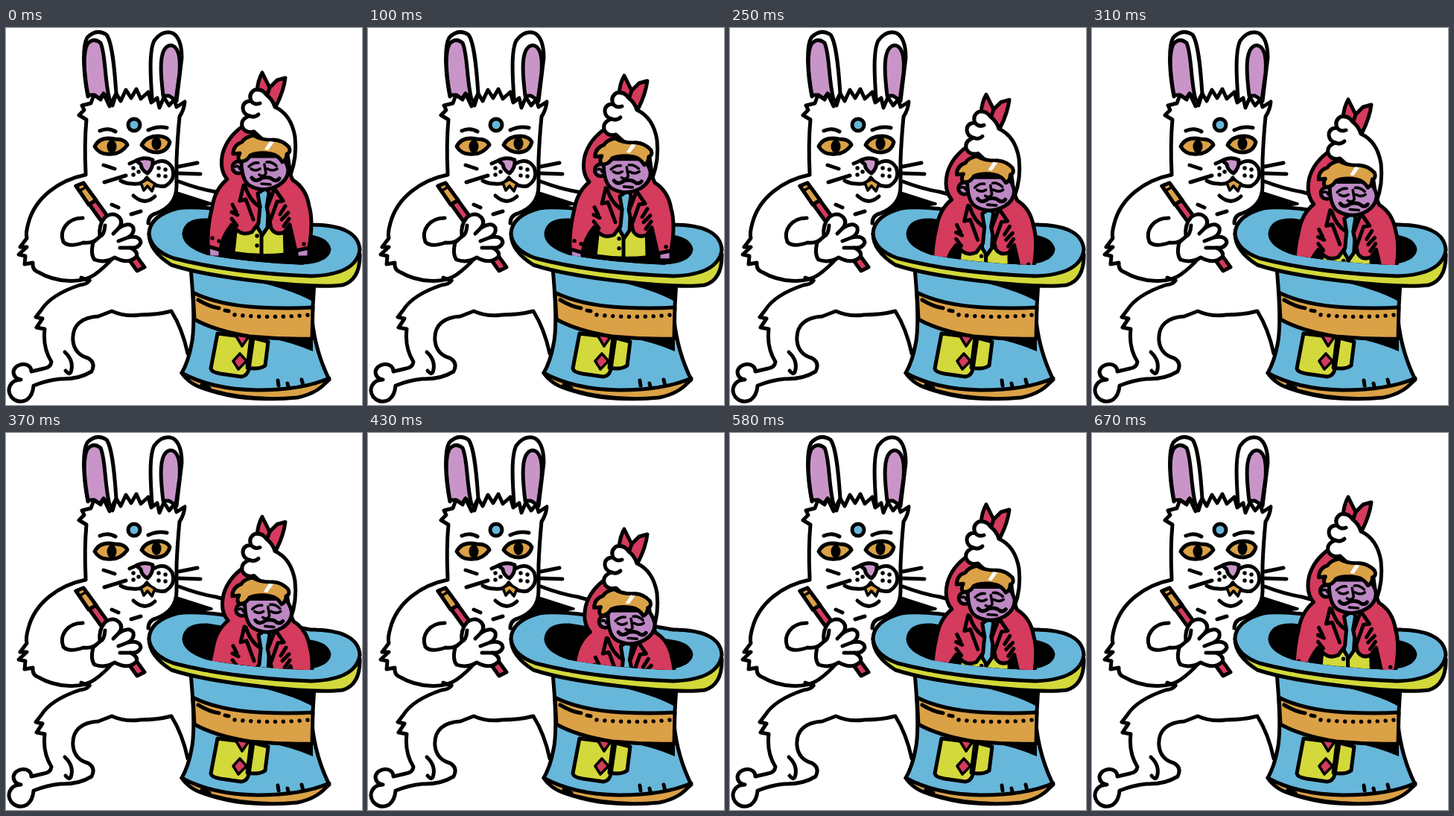
An HTML page that plays this animation: 478x506 px, repeating every 0.7 s.

```html
<!DOCTYPE html>
<html lang="en">
<meta charset="utf-8">
<title>Rabbit and hat</title>
<style>
html, body { margin: 0; height: 100%; overflow: hidden; background: #fff }
svg { display: block; width: 100vw; height: 100vh }
path, circle, ellipse { stroke: #000; stroke-width: 5; stroke-linecap: round; stroke-linejoin: round; fill: none }
.white { fill: #fff }
.blue { fill: #67b7da }
.gold { fill: #dba146 }
.red { fill: #d43b5d }
.lime { fill: #d3d93a }
.pink { fill: #c995c9 }
.skin { fill: #bd88c3 }
.ink { fill: #000 }
.bare { stroke: none }
.fine { stroke-width: 3.6 }
.spots { stroke-width: 5.4 }
</style>
<svg viewBox="0 0 478 506">
<clipPath id="rim"><path d="M0 0H478V312Q440 318 400 318Q330 315 272 305Q250 300 238 290H0Z"/></clipPath>

<g id="rabbit">
  <path d="M110 92C104 62 102 25 109 13Q121 0 135 9C143 20 146 58 148 88L143 104"/>
  <path class="pink" d="M110 90C105 62 103 35 109 22Q117 12 127 20C134 36 132 68 139 96L131 88L126 95L119 90Z"/>
  <path d="M196 94C194 65 192 31 199 17Q210 2 224 7Q236 14 236 40L229 98"/>
  <path class="pink" d="M211 91C208 65 206 42 212 30Q218 20 226 25Q235 32 233 60L228 97L219 91Z"/>
  <path d="M107 195Q105 155 108 123L98 117L105 110L102 104L114 101L118 90L127 96L131 88L139 105L148 88L154 98L161 83L168 94L175 82L181 95L191 86L195 100L203 94L206 107L212 93L219 104L226 96L229 106L240 99Q239 110 233 119Q230 150 229 178V212Q229 239 201 249Q191 252 191 262"/>
  <path class="ink fine" d="M229 221L276 236L250 240Q226 239 206 247Q224 240 229 221Z"/>
  <path d="M232 206Q258 216 282 220Q304 225 325 239"/>

  <path d="M126 138Q137 133 147 139M191 137Q204 131 216 134"/>
  <circle class="blue" cx="172" cy="130" r="8"/>
  <path class="gold" d="M119 159Q126 145 146 149Q160 149 163 157Q154 169 142 169Q126 171 119 159ZM182 157Q188 145 205 145Q217 146 220 153Q217 166 203 167Q190 167 182 157Z"/>
  <ellipse class="ink bare" cx="142" cy="159" rx="6.5" ry="9"/>
  <ellipse class="ink bare" cx="202" cy="155" rx="6.5" ry="9"/>
  <path class="pink" d="M175 178Q185 172 197 177Q198 188 190 195Q182 191 181 183Z"/>
  <path d="M166 182L175 178M198 182Q214 173 223 187Q229 203 214 212Q199 215 189 201Q183 211 170 209Q161 209 154 205"/>
  <path class="gold fine" d="M181 208L185 218L190 212L196 219L200 209L190 203Z"/>
  <path d="M171 225Q186 239 200 226M131 184L146 189M132 207L161 198M232 186L257 181M232 195L261 196M142 237L151 241M168 250L181 246"/>
  <path class="spots" d="M171 188h.1M178 193h.1M171 197h.1M205 188h.1M214 190h.1M205 198h.1M214 199h.1"/>

  <path d="M107 197C72 204 39 227 30 262Q26 276 28 282L19 294L28 294L17 304L26 306L25 317L36 315Q35 325 44 328C66 341 101 344 119 331Q133 321 144 308"/>
  <path d="M103 255C82 255 71 272 77 287Q84 295 104 288Q116 290 125 281"/>
  <path class="red" d="M94 212L104 208L186 321L176 326Z"/>
  <path class="gold" d="M94 212L104 208L121 231L111 237Z"/>
  <path class="fine" d="M98 219L108 213"/>
  <path class="white" d="M126 280Q124 264 133 254Q144 246 152 254Q158 261 151 269Q166 259 171 268Q173 276 164 281Q180 278 181 288Q178 296 167 295Q178 300 175 307Q164 318 146 308Q133 316 119 311Q113 304 117 288Z"/>
  <path d="M126 280Q132 278 133 265M151 269L144 276M164 281L151 286M167 295L153 295"/>

  <path d="M112 339Q109 344 99 345Q60 358 47 379L40 388L49 390L41 402L52 404Q49 429 61 448Q60 456 51 457L34 461C34 447 12 449 10 461Q10 470 20 472C6 472 0 485 7 495Q16 505 28 499Q36 493 37 480Q54 473 73 471Q97 472 115 461Q121 449 110 443Q92 438 90 420C88 398 103 388 124 387L142 380Q160 388 180 385Q203 385 222 380Q237 404 244 437"/>
  <path d="M112 339L101 335M79 435Q92 447 87 462Q85 466 80 460"/>
</g>

<g id="hat">
  <path class="blue" d="M248 322Q255 399 249 425Q245 447 236 463Q254 486 310 495Q400 506 434 472Q415 433 411 391L414 340Z"/>
  <path class="gold" d="M236 463Q276 485 337 486Q398 486 434 470Q421 490 391 496Q330 502 273 486Q247 480 236 463Z"/>
  <path class="ink bare" d="M300 332L413 342V368Q385 350 300 332ZM345 414L412 416V434Q385 422 345 414Z"/>
  <path class="lime" d="M329 415L352 421L348 453Q340 459 324 456ZM284 410L275 457Q276 462 288 464L316 468Q324 467 326 458L332 416Z"/>
  <path class="red fine" d="M308 412L317 427L326 414ZM314 437L323 447L312 458L305 447Z"/>
  <path class="gold" d="M251 355Q285 372 340 375Q381 377 412 375L411 417Q370 418 328 414Q282 407 253 391Z"/>
  <path d="M258 365Q273 374 286 376M294 379L299 380M365 473L366 480M378 477L379 481M397 472L399 480M263 479L273 483"/>
  <path class="spots" d="M307 385Q357 390 408 385" stroke-dasharray=".1 10.8"/>
  <path class="lime" d="M192 276Q192 299 222 318Q262 331 340 340Q420 349 452 345Q476 338 475 303Z"/>
  <path class="blue" d="M192 276Q193 252 230 242C270 236 350 254 410 264C450 264 474 275 475 298Q470 331 410 333C330 330 275 322 225 309Q194 298 192 276Z"/>
  <path class="ink" d="M270 258Q241 257 239 276Q239 292 270 302Q330 313 398 315Q432 313 434 297Q431 283 408 280Z"/>
</g>

<g clip-path="url(#rim)">
  <g id="body">
    <path class="ink bare" d="M285 250H398V303L406 390H272L285 303Z"/>
    <path class="skin" d="M271 290L272 308H288V290ZM390 290V308H407V290Z"/>
    <path class="lime" d="M309 264H374L375 304Q340 308 305 302Z"/>
    <path d="M343 266V304"/>
    <path class="spots" d="M337 279h.1M337 292h.1"/>
    <path class="blue" d="M336 215H354L351 268L344 278L338 268Z"/>
    <path class="red" d="M319 131Q297 146 291 168Q286 190 297 203Q281 216 277 239Q270 268 271 293L288 298Q290 280 303 264L310 271Q318 279 330 274L339 262L341 240L338 222L350 214L353 222L350 240L356 269Q362 279 374 274L381 264L389 299L407 295Q413 259 407 239Q403 215 385 204L379 190L350 130Z"/>
    <path d="M319 211L314 232L322 230L332 257M321 212Q327 232 341 240M361 214L351 240M361 216L372 232L364 233L355 258M304 237L309 247M303 247L311 251M303 256L310 265M375 239L368 250M379 248L370 257M380 256L373 266"/>
    <path class="spots" d="M277 282h.1M286 286h.1M400 290h.1"/>
  </g>
  <g id="fist">
    <path class="red" d="M337 86Q338 70 344 60L354 80L364 70L375 67Q373 84 363 104Z"/>
    <path d="M354 80L350 92"/>
    <path class="white" d="M350 90Q344 81 334 83Q325 88 329 98Q318 98 318 108Q319 116 327 118Q315 122 317 132Q321 142 333 139L345 150L377 162L382 197Q391 173 388 146Q383 116 361 106Q358 96 350 90Z"/>
    <path d="M329 98Q334 104 341 101M327 118Q333 121 339 116"/>
  </g>
  <g id="head">
    <circle class="skin" cx="312" cy="187" r="8"/>
    <path class="skin" d="M316 172Q315 205 328 212Q347 222 366 211Q379 203 379 190Q377 180 370 172Z"/>
    <path class="fine" d="M308 186Q312 184 314 189M326 186Q332 180 339 181M329 189Q335 193 341 189M350 180Q357 179 363 185M351 189Q358 193 364 189M347 183L349 195Q346 201 340 197M343 209L355 210"/>
    <path d="M330 201Q335 208 344 201Q354 199 359 204Q364 206 367 202"/>
  </g>
  <g id="hair">
    <path class="gold" d="M332 144Q320 147 317 153Q305 157 305 169L314 168Q310 175 314 179Q323 180 328 171Q340 166 356 169Q366 171 371 180Q377 177 377 169Q383 167 380 160Q372 151 360 150Q343 151 332 144Z"/>
    <path class="white bare" d="M354 152L347 163L352 164L360 153Z"/>
  </g>
</g>
</svg>
<script>
const depths = [[100, 4], [190, 17], [220, 26], [310, 36], [430, 69]];

// The dip advances in 30 ms steps, rests at the bottom and retraces itself.
function depthAt(t) {
  if (t < 100) return 0;
  let q = 100 + Math.floor((t - 100) / 30) * 30;
  q = q < 490 ? Math.min(q, 430) : 890 - q;
  const i = Math.max(1, depths.findIndex(key => key[0] >= q));
  const [t0, d0] = depths[i - 1], [t1, d1] = depths[i];
  return d0 + (d1 - d0) * (q - t0) / (t1 - t0);
}

function move(id, x, y) {
  document.getElementById(id).setAttribute('transform', `translate(${x} ${y})`);
}

function draw() {
  const d = depthAt(performance.now() % 700);
  move('body', d * .02, d * .93);
  move('fist', 0, d);
  move('head', d * .09, d * .96);
  move('hair', -d * .02, d * .95);
  requestAnimationFrame(draw);
}
draw();
</script>
</html>
```
